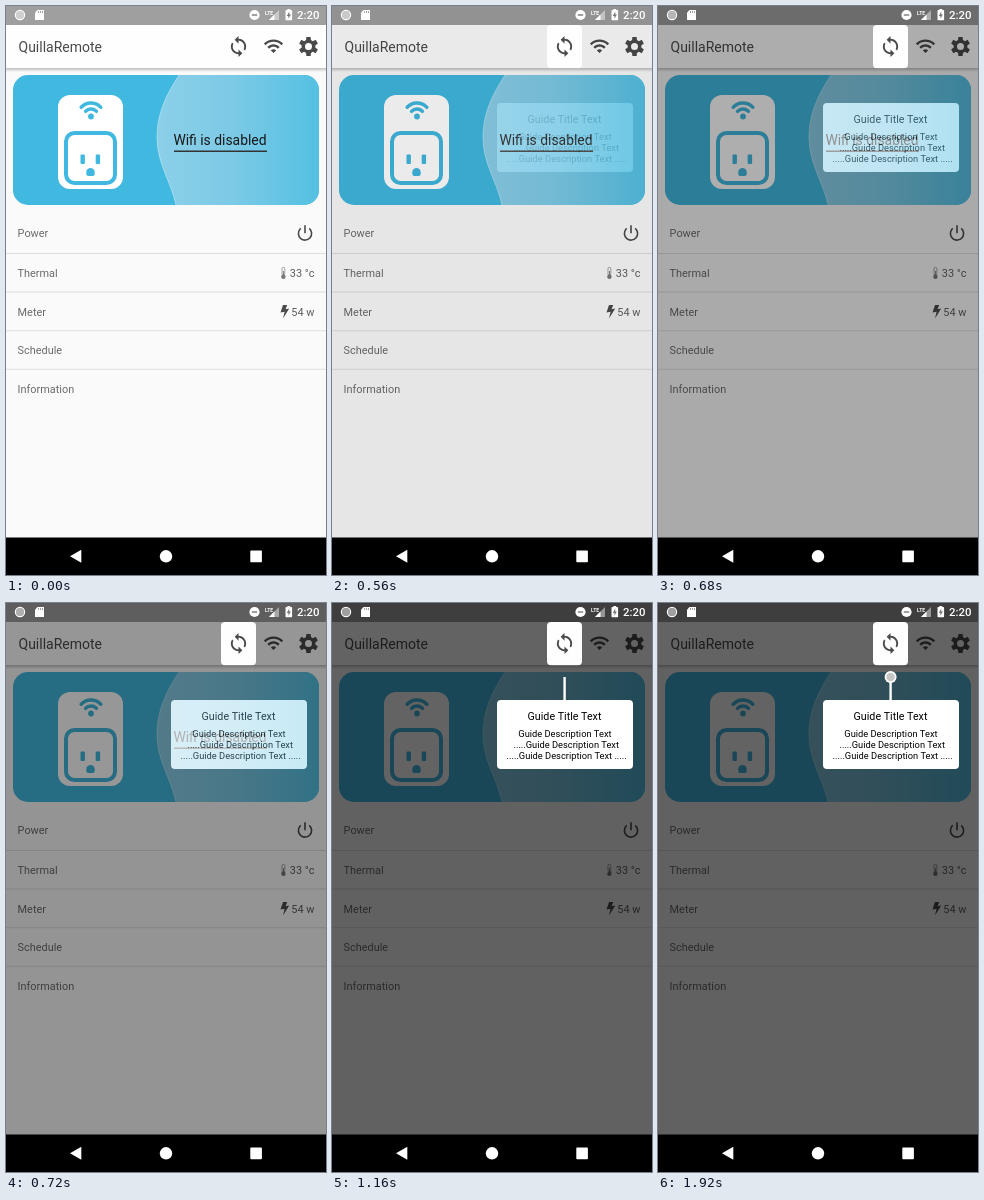
These frames come from a looping animation (320 by 569 pixels, 2480 ms). An HTML page with a canvas:

```html
<!DOCTYPE html>
<html lang="en">
<head>
<meta charset="utf-8">
<title>Guide overlay</title>
<style>
html, body { margin: 0; width: 100%; height: 100%; overflow: hidden; background: #000; }
canvas { display: block; width: 320px; height: 569px; }
</style>
</head>
<body>
<canvas id="stage"></canvas>
<script>
const W = 320, H = 569, LOOP = 2480;
const FADE = { start: 462, length: 425 };
const LINE = { start: 466, length: 700 };
const RING = { start: 1166, length: 740 };
const FONT = 'Roboto, "Open Sans", sans-serif';
const BLUE = '#40b8df', INK = '#4a4a4a', GREY = '#6b6b6b';
const SYNC = new Path2D('M12 4V1L8 5l4 4V6c3.31 0 6 2.69 6 6 0 1.01-.25 1.97-.7 2.8l1.46 1.46C19.54 15.03 20 13.57 20 12c0-4.42-3.58-8-8-8zm0 14c-3.31 0-6-2.69-6-6 0-1.01.25-1.97.7-2.8L5.24 7.74C4.46 8.97 4 10.43 4 12c0 4.42 3.58 8 8 8v3l4-4-4-4v3z');
const WIFI = new Path2D('M1 9l2 2c4.97-4.97 13.03-4.97 18 0l2-2C16.93 2.93 7.08 2.93 1 9zm8 8l3 3 3-3c-1.65-1.66-4.34-1.66-6 0zm-4-4l2 2c2.76-2.76 7.24-2.76 10 0l2-2C15.14 9.14 8.87 9.14 5 13z');

const scale = window.devicePixelRatio || 1;

function makeContext(canvas) {
  canvas.width = Math.round(W * scale);
  canvas.height = Math.round(H * scale);
  const c = canvas.getContext('2d');
  c.scale(scale, scale);
  return c;
}

const ctx = makeContext(document.getElementById('stage'));
const guide = makeContext(document.createElement('canvas'));

function box(c, x, y, w, h, fill, r = 0) {
  c.fillStyle = fill;
  c.beginPath();
  c.roundRect(x, y, w, h, r);
  c.fill();
}

function frame(c, x, y, w, h, color, width, r) {
  c.strokeStyle = color;
  c.lineWidth = width;
  c.beginPath();
  c.roundRect(x, y, w, h, r);
  c.stroke();
}

function disc(c, x, y, r, fill) {
  c.fillStyle = fill;
  c.beginPath();
  c.arc(x, y, r, 0, Math.PI * 2);
  c.fill();
}

// Arc open on one side; angles in turns.
function arc(c, x, y, r, from, to, color, width) {
  c.strokeStyle = color;
  c.lineWidth = width;
  c.beginPath();
  c.arc(x, y, r, from * Math.PI * 2, to * Math.PI * 2);
  c.stroke();
}

function poly(c, points, fill) {
  c.fillStyle = fill;
  c.beginPath();
  points.forEach(([x, y]) => c.lineTo(x, y));
  c.closePath();
  c.fill();
}

function label(c, text, x, y, size, fill, align = 'left', weight = 400) {
  c.font = `${weight} ${size}px ${FONT}`;
  c.textAlign = align;
  c.fillStyle = fill;
  c.fillText(text, x, y);
}

function icon(c, path, x, y, size, fill) {
  c.save();
  c.translate(x - size / 2, y - size / 2);
  c.scale(size / 24, size / 24);
  c.fillStyle = fill;
  c.fill(path);
  c.restore();
}

function gear(c, x, y, color) {
  c.fillStyle = color;
  c.beginPath();
  for (let i = 0; i < 6; i++) {
    const mid = i * Math.PI / 3 - Math.PI / 2;
    for (const [turn, r] of [[-0.36, 6.9], [-0.22, 9.8], [0.22, 9.8], [0.36, 6.9]]) {
      c.lineTo(x + r * Math.cos(mid + turn), y + r * Math.sin(mid + turn));
    }
  }
  c.closePath();
  c.moveTo(x + 3.5, y);
  c.arc(x, y, 3.5, 0, Math.PI * 2);
  c.fill('evenodd');
}

function toolbar(c) {
  const shade = c.createLinearGradient(0, 62, 0, 66);
  shade.addColorStop(0, 'rgba(0,0,0,.24)');
  shade.addColorStop(1, 'rgba(0,0,0,0)');
  box(c, 0, 62, W, 4, shade);
  box(c, 0, 19, W, 43, '#fefefe');
  box(c, 0, 0, W, 19, '#9f9f9f');
  label(c, 'QuillaRemote', 12.5, 46, 14, INK);
  icon(c, SYNC, 232.5, 40.5, 23, INK);
  icon(c, WIFI, 267.5, 40, 21, INK);
  gear(c, 302.5, 40.5, INK);
}

function plug(c) {
  box(c, 52, 89, 65, 94, '#fff', 12);
  c.lineCap = 'round';
  for (const r of [7.5, 13.5]) arc(c, 85, 110.5, r, 0.62, 0.88, BLUE, 3.4);
  c.lineCap = 'butt';
  disc(c, 85, 110.5, 2.9, BLUE);
  frame(c, 60, 127, 49, 50, BLUE, 4, 8.5);
  box(c, 74.5, 148.5, 4.4, 9.5, BLUE, 1);
  box(c, 89.7, 148.5, 4.4, 9.5, BLUE, 1);
  box(c, 80.3, 162, 8.4, 8, BLUE, [4.2, 4.2, 2, 2]);
}

function banner(c) {
  c.save();
  c.beginPath();
  c.roundRect(7, 69, 306, 130, 15);
  c.clip();
  box(c, 7, 69, 306, 130, BLUE);

  const pale = c.createLinearGradient(155, 0, 313, 0);
  pale.addColorStop(0, '#8bcfe8');
  pale.addColorStop(0.45, '#7ccae6');
  pale.addColorStop(1, '#54c0e2');
  const edge = new Path2D('M173 69C160 89 151 108 151 131C151 158 165 175 170 199');
  const side = new Path2D(edge);
  side.lineTo(313, 199);
  side.lineTo(313, 69);
  c.fillStyle = pale;
  c.fill(side);
  c.strokeStyle = 'rgba(190,230,244,.65)';
  c.lineWidth = 1;
  c.stroke(edge);
  c.restore();

  plug(c);
  label(c, 'Wifi is disabled', 167.4, 139, 13.9, '#171717');
  box(c, 168, 144.6, 93, 1.3, '#333');
}

function rows(c) {
  const names = ['Power', 'Thermal', 'Meter', 'Schedule', 'Information'];
  const base = [231, 271.3, 309.8, 348.3, 386.8];
  names.forEach((name, i) => label(c, name, 11.6, base[i], 10.9, GREY));
  for (let i = 0; i < 4; i++) box(c, 0, 247 + i * 38.6, W, 1, '#dedede');

  arc(c, 299, 227.5, 6.6, -0.14, 0.64, INK, 1.6);
  box(c, 298.2, 219.2, 1.6, 8, INK);
  label(c, '33 °c', 308.5, 271.3, 10.9, '#5c5c5c', 'right');
  label(c, '54 w', 308.5, 309.8, 10.9, '#5c5c5c', 'right');

  frame(c, 276, 261.3, 2.8, 8, '#8a8a8a', 0.8, 1.4);
  box(c, 277, 265, 0.8, 5, '#666');
  disc(c, 277.4, 270.7, 2.2, '#777');
  poly(c, [[277, 299], [281.2, 299], [279.6, 303.2], [283.2, 302.5],
    [277, 312.5], [278.6, 305.8], [274.5, 306.6]], INK);
}

function statusIcons(c) {
  disc(c, 14, 9, 4, 'rgba(255,255,255,.5)');
  arc(c, 14, 9, 4.6, 0, 1, '#fff', 1.2);
  poly(c, [[31.5, 4], [38, 4], [38, 14], [29, 14], [29, 6.7]], '#fff');
  for (const x of [32, 34, 36]) box(c, x, 5, 0.9, 2, '#999');

  disc(c, 248.5, 9, 5.1, '#fff');
  box(c, 245.8, 8.3, 5.4, 1.4, '#777');
  label(c, 'LTE', 259, 8.6, 5, '#fff', 'left', 700);
  poly(c, [[273, 4], [273, 14], [263, 14]], 'rgba(255,255,255,.45)');
  poly(c, [[268.5, 8.5], [268.5, 14], [263, 14]], '#fff');
  box(c, 279.5, 4, 6.6, 10.2, '#fff', 0.8);
  box(c, 281.4, 3, 2.8, 1.4, '#fff');
  poly(c, [[283.3, 5.5], [280.8, 9.9], [282.4, 9.9], [282.4, 12.7],
    [284.9, 8.5], [283.3, 8.5]], '#777');
  label(c, '2:20', 313.4, 13.2, 11.4, '#fff', 'right', 500);
}

function navBar(c) {
  box(c, 0, 531.5, W, 37.5, '#000');
  poly(c, [[64, 550.3], [75.3, 543.8], [75.3, 556.8]], '#fff');
  disc(c, 160, 550.3, 6.2, '#fff');
  box(c, 244.3, 544.6, 11.6, 11.6, '#fff', 0.8);
}

// Eases in and out along half a cosine wave.
function ease(time, span) {
  const p = Math.min(1, Math.max(0, (time - span.start) / span.length));
  return (1 - Math.cos(p * Math.PI)) / 2;
}

function drawGuide(c, time) {
  c.clearRect(0, 0, W, H);
  c.fillStyle = 'rgba(0,0,0,.61)';
  c.beginPath();
  c.rect(0, 0, W, 532);
  c.roundRect(215, 19, 35, 43.3, 4);
  c.fill('evenodd');

  const top = 116 - 42 * ease(time, LINE);
  box(c, 231.4, top, 2.4, 116 - top, '#fff');
  if (time > RING.start) {
    const r = 4.8 * ease(time, RING);
    disc(c, 232.6, top, r + 1.2, '#fff');
    if (r > 0.8) disc(c, 232.6, top, r - 0.6, '#c6c6c6');
  }

  box(c, 165, 97, 136, 69, '#fff', 4);
  label(c, 'Guide Title Text', 232.5, 116.7, 10.7, '#000', 'center');
  const text = 'Guide Description Text';
  label(c, text, 186.3, 134, 9.3, '#000');
  label(c, '.....' + text, 181.5, 145, 9.3, '#000');
  label(c, '.....' + text + ' .....', 174.6, 156, 9.3, '#000');
}

function draw(time) {
  box(ctx, 0, 0, W, H, '#fafafa');
  toolbar(ctx);
  banner(ctx);
  rows(ctx);
  const alpha = ease(time, FADE);
  if (alpha > 0) {
    drawGuide(guide, time);
    ctx.globalAlpha = alpha;
    ctx.drawImage(guide.canvas, 0, 0, W, H);
    ctx.globalAlpha = 1;
  }
  statusIcons(ctx);
  navBar(ctx);
}

let begin = null;
function tick(now) {
  if (begin === null) begin = now;
  draw((now - begin) % LOOP);
  requestAnimationFrame(tick);
}
draw(0);
requestAnimationFrame(tick);
</script>
</body>
</html>
```
